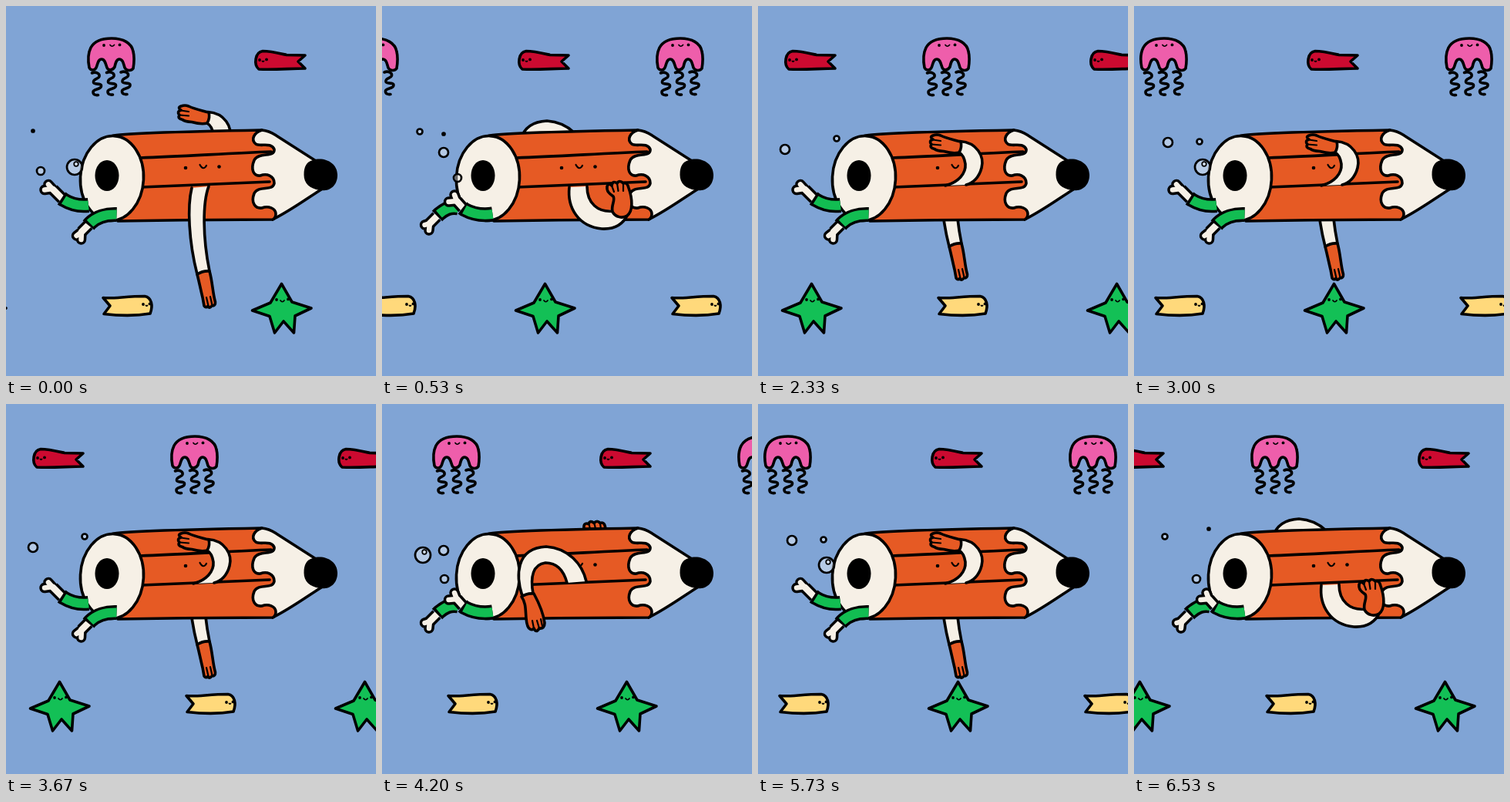
These frames come from a looping animation (480 px wide and 480 px high, 6670 ms). An HTML page:

```html
<!DOCTYPE html>
<html lang="en">
<head>
<meta charset="utf-8">
<title>Swimming pencil</title>
<style>
  html, body { margin: 0; width: 100%; height: 100%; overflow: hidden; background: #80a4d5; }
  svg { display: block; width: 100vw; height: 100vh; }
  .ink { stroke: #000; stroke-width: 3.6; stroke-linecap: round; stroke-linejoin: round; }
  .line { fill: none; }
  .thin { fill: none; stroke-width: 2.2; }
  .smile { fill: none; stroke-width: 1.7; }
  .cream { fill: #f6f0e6; }
  .orange { fill: #e65a24; }
  .dot { fill: #000; }
</style>
</head>
<body>
<svg viewBox="0 0 480 480" id="stage"></svg>
<script>
const STEP = 1000 / 15;        // display tick
const LOOP = STEP * 100;
const WRAP = 396;              // distance between repeats of a creature
const DRIFT = [0, 40, 98, 146, 194, 240, 288, 350];

const shape = (d, fill) => `<path class="ink" fill="${fill}" d="${d}"/>`;
const part = (d, cls) => `<path class="ink ${cls}" d="${d}"/>`;
const dot = (x, y, r) => `<circle class="dot" cx="${x}" cy="${y}" r="${r}"/>`;
const face = (x1, x2, y, r, smile) => dot(x1, y, r) + dot(x2, y - 0.6, r) + part(smile, 'smile');
const group = (body, attr = '') => `<g ${attr}>${body}</g>`;
const shift = (body, x, y) => group(body, `transform="translate(${x} ${y})"`);

// Sea creatures
const tentacle = part('M111.500 87C116 85 122 87 121 91.500C120 95 113 94 113.500 99C114 103 124 99 123.500 104C123 109 113 107 113 111.500C113 115 116 116 119.500 115.500', 'line');
const jelly =
  tentacle + shift(tentacle, 19, -0.5) + shift(tentacle, 37.5, -1) +
  shape('M108 80C106 70 107 60 110 54C115 45 125 42 137 42C152 42 163 48 165 59C167 67 166 75 165 81C162 85 156 84 154 80C152 73 151 69 147 69C143 69 142 75 141 79C138 84 133 84 131 80C129 74 128 69 124 69C119 69 119 76 117 80C115 84 110 84 108 80Z', '#ee5eab') +
  face(127, 147.5, 51, 1.9, 'M135 50.500Q137.500 54 140.500 50.500');
const redFish =
  shape('M333 58.500C343 58.500 353 61 364 63.500L388 64 379 72 388 81C368 81 350 83 328 82C321 76 323 60 333 58.500Z', '#cc0a30') +
  face(329, 338, 70, 1.9, 'M332.500 71.500Q333.500 73 334.500 71.500');
const yellowFish =
  shape('M126 378.500C138 380 156 376.500 180 376.500C189 378 191 389 187 399C170 402 148 402 127 399.500L135 389Z', '#ffd97b') +
  face(178, 186.5, 387, 1.9, 'M181.500 388.500Q182.500 390 183.500 388.500');
const star =
  shape('M357.500 360.500L371 384 396 392 375 402 373.500 424 360 409 348.500 424 342 402.500 319.500 395 343 385Z', '#13c056') +
  face(351, 366, 381, 1.9, 'M356 382Q358.500 385.500 361 382');
const creatures = [[jelly, 106], [redFish, 323], [yellowFish, 125], [star, 319]];

// Pencil
const edge = 'C322 164 317 173 324 179C330 183 344 176 348 186C349 197 328 189 322 200C317 212 321 221 330 220C338 217 348 220 348 230C346 241 328 232 322 243C317 256 324 263 332 262C340 259 350 262 350 270C350 274 348 276 346 277';
const pencil =
  '<path class="cream" d="M332 161L316 163V275L346 277L390 240Z"/>' +
  part('M332 161C343 162 347 166 352 169L402 201L409 238C390 250 370 265 346 277', 'cream') +
  part(`M138 168.500C150 164.500 250 162.500 332 161${edge}C285 277 210 278 145 279Z`, 'orange') +
  part('M174 197C230 195 290 191 344 189M176 235C230 233 290 230 342 228', 'line') +
  '<path class="dot" d="M398 200C412 195 430 203 430 219C430 235 418 241 407 239C394 237 386.500 230 386.500 219C386.500 208 390 202 398 200Z"/>' +
  '<ellipse class="ink cream" cx="137.500" cy="223.500" rx="41" ry="55" transform="rotate(3 137 223)"/>' +
  '<ellipse class="dot" cx="131" cy="220" rx="15.500" ry="20"/>' +
  dot(233, 210, 2.3) + dot(276.5, 208.5, 2.3) + part('M251.500 206Q256 214 260 207', 'thin');

// Arm poses: fill, outlines, then the hand
const sleeve = (area, lines) => `<path class="cream" d="${area}"/>` + part(lines, 'line');
const hand = (d, fingers) => part(d, 'orange') + part(fingers, 'thin');

const armDown =
  sleeve('M241 236C235 260 237 305 248 348L264 344C255 300 255 255 263 234Z',
         'M241 236C235 260 237 305 248 348M264 344C255 300 255 255 263 234') +
  hand('M248 348C251 360 253 370 255 378L257 389Q259 392 262 389.500Q264 393 267 389Q272 389 271.500 384C268 372 268 358 264 344Q256 343 248 348Z',
       'M260 378L262.500 389M265 377L267.500 388');
const armBack =
  sleeve('M182 249C174 225 172 187 213 185C242 187 260 208 265 230L240 232C236 217 228 206 212 206C196 208 192 224 196 246Z',
         'M182 249C174 225 172 187 213 185C242 187 260 208 265 230M240 232C236 217 228 206 212 206C196 208 192 224 196 246') +
  hand('M181 250C187 258 186 268 187 278Q188 290 192 292Q195 294 197 291Q200 298 204 291Q211 292 211 284C209 270 203 257 197 246Q188 245 181 250Z',
       'M195 281L197 291M201 281L204 291M206 279L208 288');
const armOver =
  sleeve('M262 175.500C284 177 294 195 290 210C287 222 279 230 270 232L243 233C260 229 270 217 269 205C268 198 266 193 261 190Z',
         'M262 175.500C284 177 294 195 290 210C287 222 279 230 270 232M243 233C260 229 270 217 269 205C268 198 266 193 261 190') +
  hand('M263 176C252 173 245 172 237 168Q232 166 227 168Q222 170 227 173Q221 175 225 179.500Q222 184 229 185.500Q232 188 241 188.500C250 191 257 191 261 190Q265 183 263 176Z',
       'M227 173.500L237 175M225.500 179.500L237 180.500');
const armFront =
  sleeve('M243 235C240 262 255 286 285 289C304 290 314 281 319 270L300 264C280 268 266 256 266 234Z',
         'M243 235C240 262 255 286 285 289C304 290 314 281 319 270M300 266C280 268 266 256 266 234') +
  hand('M299 267C297 258 303 252 300 247C296 244 291 241 292 234Q294 229 298 233Q299 226 305 230Q308 225 313 230Q318 228 320 236C325 250 326 266 318 272C312 276 303 274 299 267Z',
       'M298 233L301 241M305 230L306.500 240M313 231L313 240');
const fingers = hand('M262 162Q261 153 268 155.500Q270 150 275 154.500Q279 150 283 154.500Q289 152 290 162Z',
                     'M268.500 156L270 162M275.500 155L277 162M283 155L284 162');

const frontArms = [armDown, armBack, armOver, armFront];
const backArms = [shift(armOver, 0, -38), fingers, shift(armDown, 0, -36), shift(armBack, 1, -36)];

// Legs: thick strokes over black ones; the cuff is the black end of the thigh
const stroke = (d, w, c, cap) =>
  `<path d="${d}" fill="none" stroke="${c}" stroke-width="${w}" stroke-linecap="${cap}" stroke-linejoin="round"/>`;
const leg = (thigh, cuff, shin, toes) =>
  stroke(shin, 15.5, '#000', 'butt') + stroke(toes, 13.5, '#000', 'round') +
  stroke(shin, 8.5, '#f6f0e6', 'round') + stroke(toes, 6.5, '#f6f0e6', 'round') +
  stroke(thigh + cuff, 19, '#000', 'butt') + stroke(thigh, 12, '#12bd52', 'butt');
const legPoses = [
  leg('M107 258.500C94 260 84 257 75 251.500', 'L72 249.500', 'M73 250L61 238', 'M60 237L55 231.500M60 237L50 238.500') +
  leg('M143.500 270.500C130 270 117 274 109 282', 'L107 284.500', 'M107 284L98 293', 'M98 293L91.500 298M98 293L97.500 303'),
  leg('M99 262C88 260 81 264 74 270', 'L71.500 272.500', 'M71 273L62 282', 'M62 282L55.500 284M62 282L61 291') +
  leg('M143.500 270C130 272 118 270 107 264', 'L104.500 262', 'M105 262L97 253', 'M97 253L94 245M97 253L86.500 254')
];

// Bubbles: one rising path shared by five sources [first step, dx, dy]
const RISE = [[81, 227, 5], [89, 209, 10], [80, 190, 6], [85, 176, 3.5], [80, 166, 1.5]];
const SOURCES = [[7, 0, 0], [1, 0, 0], [0, -36, -13], [3, 17, -4], [4, -45, -4]];
const ring = (x, y, r, w) =>
  `<circle cx="${x}" cy="${y}" r="${r}" fill="#fff" fill-opacity=".42" stroke="#000" stroke-width="${w}"/>`;
function bubbles(step) {
  return SOURCES.map(([first, dx, dy]) => {
    const p = RISE[(step - first + 8) % 8];
    if (!p) return '';
    const x = p[0] + dx, y = p[1] + dy, r = p[2];
    return ring(x, y, r, 2.7) + (r > 9 ? ring(x + 2, y - 4, 2.8, 1.7) : '');
  }).join('');
}

function sea(step) {
  return creatures.map(([body, x]) => {
    const left = (x - DRIFT[step] + 80 + WRAP) % WRAP - 80;
    return shift(body, left - x, 0) + shift(body, left - x + WRAP, 0);
  }).join('');
}

const stage = document.getElementById('stage');
stage.innerHTML = '<rect width="480" height="480" fill="#80a4d5"/>' +
  DRIFT.map((_, i) => group(
    sea(i) + backArms[i % 4] + pencil + legPoses[i % 2] + frontArms[i % 4] + bubbles(i),
    'class="pose" display="none"')).join('');
const poses = [...stage.querySelectorAll('.pose')];

let shown = -1;
function draw(time) {
  const tick = Math.floor((time % LOOP + 4) / STEP);
  const step = Math.floor(tick * 2 / 5) % 8;
  if (step !== shown) {
    poses.forEach((p, i) => p.setAttribute('display', i === step ? 'inline' : 'none'));
    shown = step;
  }
}
const start = performance.now();
function run() {
  draw(performance.now() - start);
  requestAnimationFrame(run);
}
run();
</script>
</body>
</html>
```
